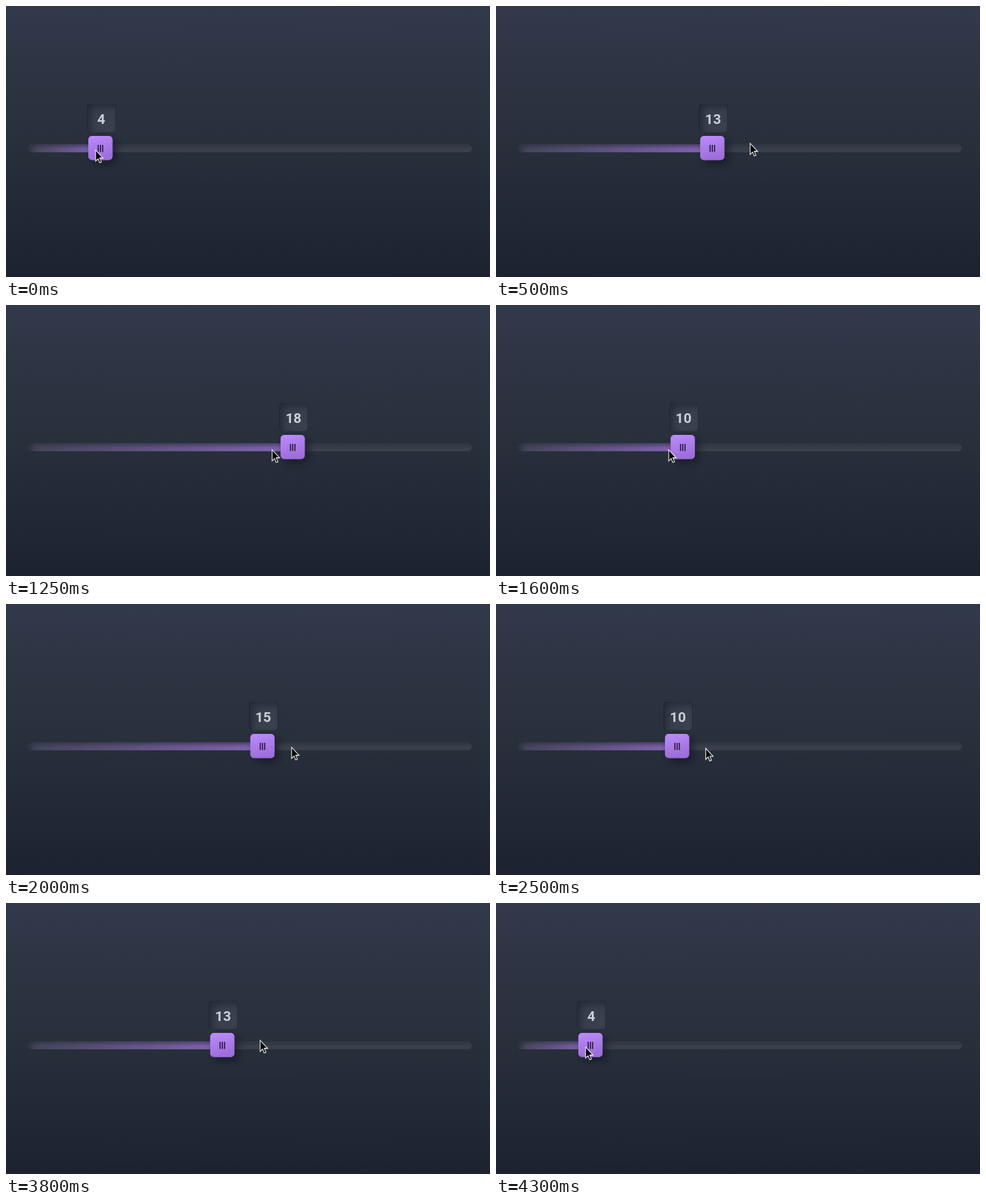
An HTML page with a canvas for the animation above (4350 ms loop, 647 by 363 pixels).

```html
<!DOCTYPE html>
<html lang="en">
<head>
<meta charset="utf-8">
<title>Range slider</title>
<style>
  html, body { margin: 0; width: 100%; height: 100%; overflow: hidden; background: #272e3b; }
  canvas { display: block; width: 647px; height: 363px; }
</style>
</head>
<body>
<canvas id="stage" width="647" height="363"></canvas>
<script>
const ctx = document.getElementById('stage').getContext('2d');
const W = 647, H = 363;
const STEP = 50, STEPS = 87;
const TRACK = { x: 27, y: 185, w: 596, h: 11, r: 4.5 };
const THUMB = 32.5, MAX = 30;
const LAG = 1.7; // steps by which the thumb trails the pointer

// Where the pointer turns or passes: step, x, y
const drag = [
  [-2, 126.5, 192], [2, 111.5, 192], [10, 339, 183], [17.5, 455, 187],
  [25, 355, 193], [32.7, 228, 193], [40, 381, 191], [48, 490, 189],
];

// Flat at the ends and turning points, otherwise the slope between the neighbours
function slope(i, axis) {
  const a = drag[i - 1], b = drag[i], c = drag[i + 1];
  if (!a || !c || (b[axis] - a[axis]) * (c[axis] - b[axis]) <= 0) return 0;
  return (c[axis] - a[axis]) / (c[0] - a[0]);
}

function pointer(t, axis) {
  let i = 0;
  while (t >= drag[i + 1][0]) i++;
  const a = drag[i], b = drag[i + 1];
  const d = b[0] - a[0], u = (t - a[0]) / d, v = 1 - u;
  return a[axis] + (b[axis] - a[axis]) * u * u * (3 - 2 * u)
    + d * u * v * (slope(i, axis) * v - slope(i + 1, axis) * u);
}

function gradient(x0, y0, x1, y1, ...stops) {
  const g = ctx.createLinearGradient(x0, y0, x1, y1);
  stops.forEach((c, i) => g.addColorStop(i / (stops.length - 1), c));
  return g;
}

function box(x, y, w, h, r) {
  ctx.beginPath();
  ctx.roundRect(x, y, w, h, r);
}

function shadow(color, blur, dx, dy) {
  ctx.shadowColor = color;
  ctx.shadowBlur = blur;
  ctx.shadowOffsetX = dx;
  ctx.shadowOffsetY = dy;
}

function insetShadow(x, y, w, h, r, color, blur, dx, dy) {
  ctx.save();
  box(x, y, w, h, r);
  ctx.clip();
  shadow(color, blur, dx, dy);
  ctx.beginPath();
  ctx.rect(x - 40, y - 40, w + 80, h + 80);
  ctx.roundRect(x, y, w, h, r);
  ctx.fillStyle = '#000';
  ctx.fill('evenodd');
  ctx.restore();
}

function drawTrack(cx) {
  const { x, y, w, h, r } = TRACK;
  ctx.save();
  box(x, y, w, h, r);
  ctx.clip();
  ctx.fillStyle = '#3d434e';
  ctx.fillRect(x, y, w, h);
  ctx.fillStyle = gradient(x, 0, cx, 0, 'rgba(156,112,212,0.1)', 'rgba(156,112,212,0.95)');
  ctx.fillRect(x, y, cx - x, h);
  ctx.restore();
  insetShadow(x, y, w, h, r, 'rgba(38,45,57,0.9)', 8, 7, 3);
}

function drawLabel(cx) {
  const x = cx - 17.5, y = 131, s = 38;
  box(x, y, s, s, 4);
  ctx.fillStyle = gradient(x, y, x + s, y + s, '#343b49', '#3a424f');
  ctx.fill();
  insetShadow(x, y, s, s, 4, 'rgba(30,36,47,0.8)', 10, 4, 4);
  const value = Math.floor((cx - TRACK.x - THUMB / 2) / (TRACK.w - THUMB) * MAX);
  ctx.font = 'bold 18.5px Roboto, Arial, sans-serif';
  ctx.textAlign = 'center';
  ctx.fillStyle = '#cbd0da';
  ctx.fillText(value, cx + 1, 158.4);
}

function drawThumb(cx) {
  const x = cx - THUMB / 2, y = 174;
  ctx.save();
  shadow('rgba(14,18,28,0.65)', 12, 5, 5);
  box(x, y, THUMB, THUMB, 5);
  ctx.fillStyle = gradient(x, y, x + 8, y + THUMB, '#bd8bfb', '#9d6edb');
  ctx.fill();
  ctx.restore();
  ctx.fillStyle = '#20182f';
  for (const dx of [-3, 0, 3]) ctx.fillRect(cx + dx - 0.7, 186, 1.4, 9.5);
}

function drawPointer(x, y) {
  ctx.save();
  ctx.translate(x + 0.8, y + 1);
  ctx.scale(0.9, 0.95);
  ctx.beginPath();
  ctx.moveTo(0, 0);
  for (const [px, py] of [[0, 15.6], [3.6, 12.2], [6, 17.8], [8.6, 16.7], [6.2, 11.2], [11, 11.2]])
    ctx.lineTo(px, py);
  ctx.closePath();
  ctx.fillStyle = '#000';
  ctx.fill();
  ctx.lineWidth = 1.1;
  ctx.strokeStyle = '#f4f4f6';
  ctx.stroke();
  ctx.restore();
}

function draw(now) {
  const k = Math.floor(now / STEP) % STEPS;
  const t = Math.min(k, STEPS - 1 - k); // forth, then back
  const cx = pointer(t - LAG, 1);
  ctx.fillStyle = gradient(0, 0, 0, H, '#31394b', '#28303c', '#1d2230');
  ctx.fillRect(0, 0, W, H);
  drawTrack(cx);
  drawLabel(cx);
  drawThumb(cx);
  drawPointer(pointer(t, 1), pointer(t, 2));
}

let start;
function tick(now) {
  start ??= now;
  draw(Math.max(0, now - start));
  requestAnimationFrame(tick);
}
draw(0);
requestAnimationFrame(tick);
</script>
</body>
</html>
```
